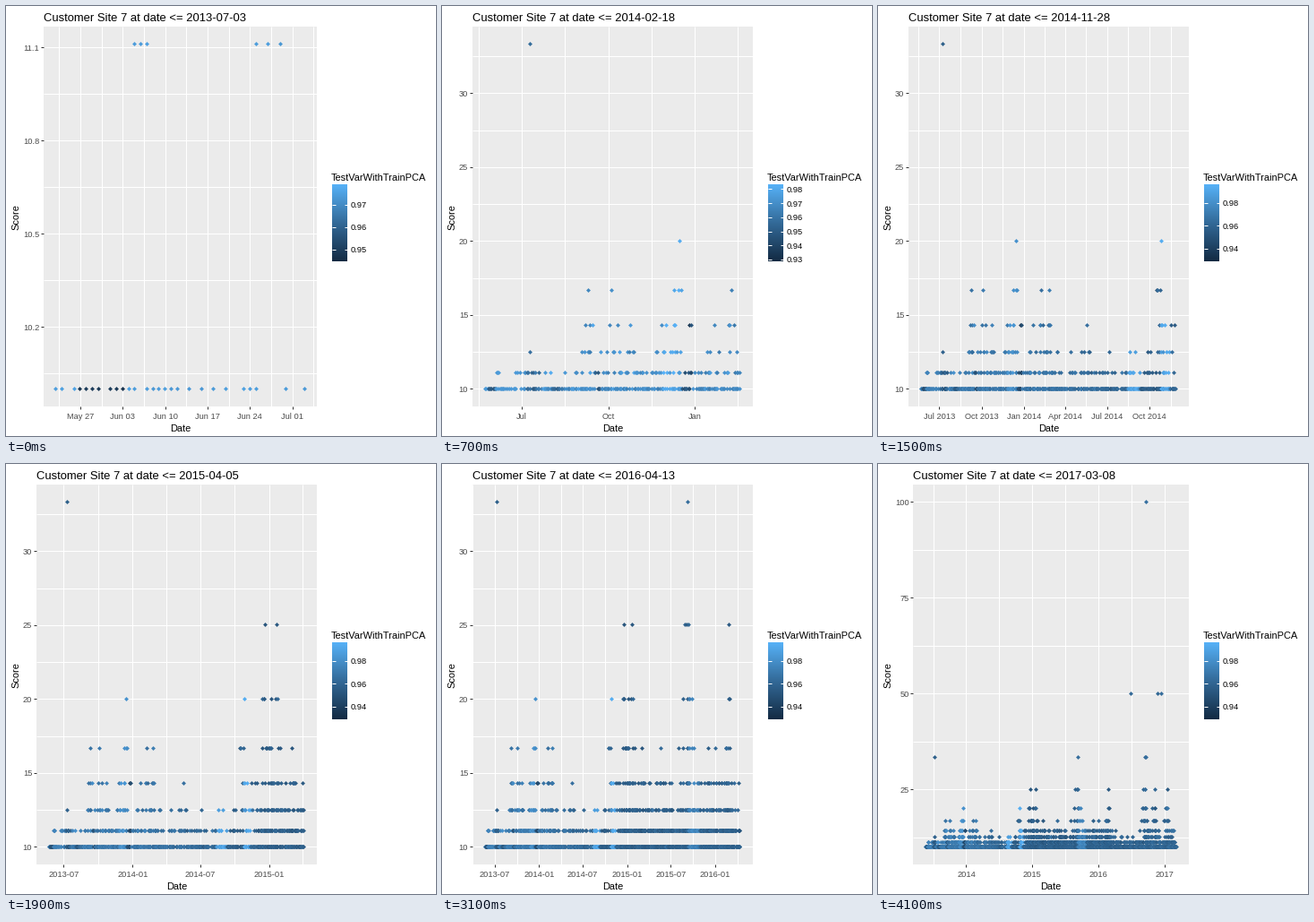
Animation of 480x480 px, one loop 4200 ms. Source, as a matplotlib script:

```python
import numpy as np
import matplotlib.pyplot as plt
from matplotlib.animation import FuncAnimation
from matplotlib.colors import LinearSegmentedColormap

SIZE, DPI = 480, 80
PX = 72 / DPI  # points per pixel
FRAMES, INTERVAL = 42, 100
TOP, BOTTOM, RIGHT = 23.2, 446.7, 347
BAR_X0, BAR_X1, BAR_TOP, BAR_BOTTOM = 364, 381, 199, 285
MONTHS = "Jan Feb Mar Apr May Jun Jul Aug Sep Oct Nov Dec".split()

plt.rcParams["font.family"] = "Liberation Sans"
START = np.datetime64("2013-05-23")
END = 1385
BLUES = LinearSegmentedColormap.from_list(
    "blues", ["#132B43", "#336A98", "#56B1F7"])

# Last day shown in each frame, counted from START
LAST_DAY = np.rint(np.interp(
    np.arange(FRAMES),
    [0, 7, 15, 24, 31, 35, 41],
    [41, 271, 554, 841, 1056, 1193, END])).astype(int)

# Every score is 100 / rank. A peak spreads downwards into lower scores.
PEAKS = [(48, 8), (110, 6), (135, 6), (155, 7), (188, 7), (207, 5), (262, 6),
         (278, 6), (360, 7), (523, 5), (578, 4), (609, 4), (649, 6), (729, 6),
         (841, 3), (926, 6), (956, 6), (1010, 4), (1216, 3), (1268, 4),
         (1340, 4)]
LONE = [(48, 3), (1135, 2), (1221, 1), (1221, 3), (1285, 2), (1305, 2)]

# Spells in which the plotted variance is shifted: first day, last day, shift
SPELLS = [(4, 11, -.026), (45, 60, -.016), (72, 84, -.015), (117, 122, -.025),
          (190, 209, .011), (210, 219, -.022), (450, 476, .030),
          (480, 517, -.004), (523, 540, .033), (845, 890, .017)]

rng = np.random.default_rng(7)


def make_points():
    points = set(LONE)

    def add(days, rank):
        points.update((int(day), rank) for day in days)

    add(np.r_[0:2, 3:8, 9:14, 15:21, 22:29:2, 31:34, 38], 10)
    add(np.r_[13:16, 33:38:2], 9)
    add(LAST_DAY, 10)

    # Background: scores above 10 get more common after the first half
    days = np.arange(42, END + 1)
    activity = np.interp(days, [540, 580, 1030, 1060], [.3, 1, 1, .5])
    chances = {10: .7, 9: .55 * activity, 8: .2 * activity ** 2,
               7: .08 * activity ** 3}
    for rank, chance in chances.items():
        add(days[rng.random(len(days)) < chance], rank)

    for day, rank in PEAKS:
        add([day], rank)
        for depth in range(1, 10 - rank):
            spread = rng.normal(day, 2 + 4 * depth, 1 + 2 * depth)
            add(np.clip(spread, 42, END), rank + depth)

    days, ranks = np.array(sorted(points)).T
    return days, 100 / ranks


def make_values(days):
    values = np.interp(days, [0, 300, 600, END], [.974, .966, .957, .961])
    for first, last, shift in SPELLS:
        values[(days >= first) & (days <= last)] += shift
    return values + rng.normal(0, 1, len(days)) * np.where(days < 42, .001, .004)


DAYS, SCORES = make_points()
VALUES = make_values(DAYS)


def value_limits(last):
    low = .9448 if last < 121 else .9287
    high = .979 if last < 200 else .9835 if last < 450 else .9965
    return low, high


def date_breaks(span):
    """Break days and their labels, aiming at five intervals."""
    lengths = [7, 15.2, 30.44, 91.3, 182.6, 365.25]
    kind = int(np.argmin([abs(span / n - 5) for n in lengths]))
    if kind == 0:
        dates = START + np.arange(-10, 80, 7)
    elif kind == 1:
        firsts = np.arange("2013-04", "2013-12", dtype="datetime64[M]")
        firsts = firsts.astype("datetime64[D]")
        dates = np.sort(np.concatenate([firsts, firsts + 14]))
    else:
        step = [1, 3, 6, 12][kind - 2]
        months = np.arange("2013-01", "2018-02", step, dtype="datetime64[M]")
        dates = months.astype("datetime64[D]")

    def label(date):
        year, month, day = str(date).split("-")
        name = MONTHS[int(month) - 1]
        if kind < 2:
            return f"{name} {day}"
        if kind < 4:
            return name if span < 365 else f"{name} {year}"
        return f"{year}-{month}" if kind == 4 else year

    return (dates - START).astype(int), [label(d) for d in dates]


def score_step(top):
    """Break step and left panel edge for the highest score."""
    if top < 12:
        return 0.3, 42
    if top < 40:
        return 5, 34
    return (10, 34) if top < 60 else (25, 39.4)


fig = plt.figure(figsize=(SIZE / DPI, SIZE / DPI), dpi=DPI, facecolor="white")
ax = fig.add_axes([0, 0, 1, 1])


def text(x, y, string, size, color="black", va="baseline", **kw):
    ax.text(x, y, string, fontsize=size * PX, color=color, va=va, **kw)


def line(xs, ys, color="white"):
    ax.plot(xs, ys, color=color, lw=PX, solid_capstyle="butt")


def draw_legend(low, high):
    text(363, 195, "TestVarWithTrainPCA", 11)
    ax.imshow(np.linspace(1, 0, 86)[:, None], cmap=BLUES, vmin=0, vmax=1,
              extent=(BAR_X0, BAR_X1, BAR_BOTTOM, BAR_TOP), aspect="auto",
              interpolation="nearest")
    step = 0.02 if high - low > 0.06 else 0.01
    for n in range(int(np.ceil(low / step)), int(high / step) + 1):
        value = n * step
        y = BAR_BOTTOM - (value - low) / (high - low) * (BAR_BOTTOM - BAR_TOP)
        line([BAR_X0, BAR_X0 + 3.5], [y, y])
        line([BAR_X1 - 3.5, BAR_X1], [y, y])
        text(385, y + 3.4, f"{value:.2f}", 9.3)


def draw(frame):
    ax.clear()
    ax.axis("off")
    last = LAST_DAY[frame]
    shown = DAYS <= last
    days, scores, values = DAYS[shown], SCORES[shown], VALUES[shown]
    top = scores.max()
    step, left = score_step(top)
    pad_x = (RIGHT - left) / 22
    pad_y = (BOTTOM - TOP) / 22

    def to_x(day):
        return left + pad_x + day / last * (RIGHT - left - 2 * pad_x)

    def to_y(score):
        height = BOTTOM - TOP - 2 * pad_y
        return BOTTOM - pad_y - (score - 10) / (top - 10) * height

    def in_x(x):
        return left < x < RIGHT

    def in_y(y):
        return TOP < y < BOTTOM

    ax.fill([left, RIGHT, RIGHT, left], [TOP, TOP, BOTTOM, BOTTOM],
            color="#EBEBEB", lw=0)

    breaks, labels = date_breaks(last)
    marks = np.arange(int(top / step) + 3) * step

    for x in to_x((breaks[1:] + breaks[:-1]) / 2):
        if in_x(x):
            line([x, x], [TOP, BOTTOM])
    for y in to_y(marks + step / 2):
        if in_y(y):
            line([left, RIGHT], [y, y])
    for x, label in zip(to_x(breaks), labels):
        if in_x(x):
            line([x, x], [TOP, BOTTOM])
            line([x, x], [BOTTOM, BOTTOM + 3], "#333333")
            text(x, 461, label, 9.3, "#4D4D4D", ha="center")
    for y, mark in zip(to_y(marks), marks):
        if in_y(y):
            line([left, RIGHT], [y, y])
            line([left - 3, left], [y, y], "#333333")
            text(left - 4.8, y + 3.4, f"{mark:.4g}", 9.3, "#4D4D4D", ha="right")

    low, high = value_limits(last)
    ax.scatter(np.floor(to_x(days)) + 0.5, np.floor(to_y(scores)) + 0.5,
               s=(4.9 * PX) ** 2, marker=(4, 0, 0), c=values, cmap=BLUES,
               vmin=low, vmax=high, linewidths=0, snap=False, zorder=3)

    text(left, 17, f"Customer Site 7 at date <= {START + last}", 13)
    text((left + RIGHT) / 2, 475, "Date", 11, ha="center")
    text(16, 235.5, "Score", 11, va="center", ha="right", rotation=90)
    draw_legend(low, high)
    ax.set_xlim(0, SIZE)
    ax.set_ylim(SIZE, 0)


anim = FuncAnimation(fig, draw, frames=FRAMES, interval=INTERVAL,
                     repeat=True, repeat_delay=0)
plt.show()
```
